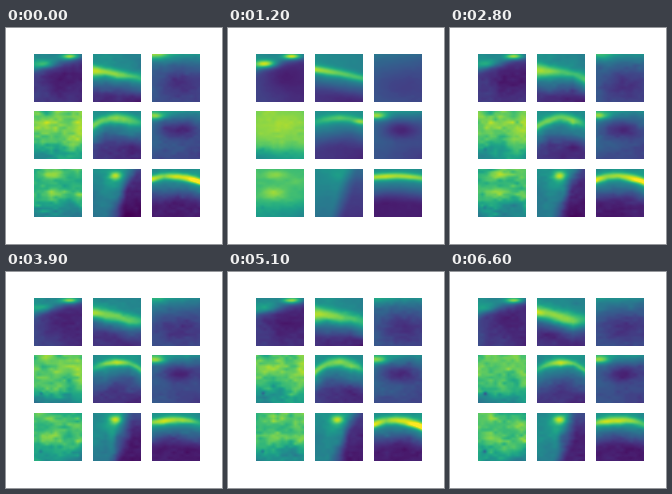
Animation of 216 by 216 pixels, one loop 6800 ms. Source, as a matplotlib script:

```python
import numpy as np
import matplotlib.pyplot as plt
from matplotlib.animation import FuncAnimation

STAGE, N = 216, 48
STEPS, INTERVAL = 68, 100
LEFTS, TOPS = (28, 87, 146), (26, 83, 141)

axis = (np.arange(N) + 0.5) / N
X, Y = np.meshgrid(axis, axis)


def blob(x, y, sx, sy):
    return np.exp(-((X - x) / sx) ** 2 - ((Y - y) / sy) ** 2)


def band(c, w):
    return np.exp(-((Y - c) / w) ** 2)


def above(c, soft):
    return 1 / (1 + np.exp(np.clip((Y - c) / soft, -40, 40)))


def ramp(d, length):
    s = np.clip(d / length, 0, 1)
    return s * s * (3 - 2 * s)


def bow(left, mid, right):
    """Parabola through three heights across the tile."""
    return (left * (1 - X) * (1 - 2 * X) + 4 * mid * X * (1 - X)
            + right * X * (2 * X - 1))


def upsample(n):
    """Linear interpolation weights from n nodes to N pixels."""
    pos = axis * (n - 1)
    return np.maximum(0, 1 - abs(pos[:, None] - np.arange(n)))


def noise(seed, rows, cols):
    grid = np.random.default_rng(seed).normal(size=(rows, cols))
    return upsample(rows) @ grid @ upsample(cols).T


# Each tile takes calm (0..1, how smooth the picture is), grow (0..1 over
# the loop), sway (-1..1) and lumps, a slowly changing cloud texture.

def ridge(calm, grow, sway, lumps):
    c = bow(0.28, 0.12, 0.02) + 0.03 * lumps
    glow = (0.2 - 0.12 * grow + 0.3 * calm) * blob(0.2, 0.21, 0.22, 0.08)
    peak = (0.42 + 0.1 * calm) * blob(0.75, 0.05, 0.18, 0.06)
    return (0.12 + 0.08 * (1 - X) - 0.07 * blob(0.55, 0.5, 0.4, 0.3)
            + 0.3 * above(c, 0.06) * (1 - 0.2 * X) + 0.13 * band(c, 0.12)
            + glow + peak)


def slope(calm, grow, sway, lumps):
    c = bow(0.33, 0.41, 0.51) - 0.03 * grow + 0.03 * lumps
    width = 0.1 + 0.05 * grow - 0.02 * calm
    return (0.5 - 0.06 * X - 0.35 * ramp(Y - c, 0.55)
            + (0.38 - 0.14 * X) * (1 + 0.2 * lumps) * band(c, width))


def haze(calm, grow, sway, lumps):
    return (0.22 + 0.05 * (1 - X)
            + (0.3 - 0.04 * grow - 0.16 * calm) * np.exp(-Y / 0.24)
            + 0.3 * (1 - calm) * (1 - grow) * blob(0.05, 0, 0.3, 0.12)
            - 0.12 * (1 - 0.5 * calm) * blob(0.55, 0.62, 0.5, 0.32))


def meadow(calm, grow, sway, lumps):
    return (0.73 + 0.05 * calm + 0.02 * sway
            - 0.2 * ramp(Y - 0.6, 0.4) - 0.1 * blob(0, 1, 0.4, 0.3)
            + 0.07 * blob(0.45, 0.3, 0.5, 0.25)
            + 0.1 * (1 - calm) * blob(0.95, 0.35, 0.12, 0.3)
            - 0.08 * grow * blob(0.5, 0.55, 0.4, 0.25)
            - 0.25 * grow * blob(0.15, 0.8, 0.04, 0.04))


def arch(calm, grow, sway, lumps):
    rise = 0.12 + 0.06 * grow - 0.04 * calm
    c = bow(0.15 + rise, 0.15, 0.14 + rise) + 0.02 * lumps
    crest = 1 - 0.45 * abs(2 * X - 1) + 0.15 * lumps
    return (0.5 - 0.33 * ramp(Y - c, 0.65) - 0.06 * X * Y
            + (0.36 - 0.12 * calm) * crest * band(c, 0.09)
            + 0.2 * calm * blob(0.95, 0.22, 0.15, 0.06))


def hollow(calm, grow, sway, lumps):
    return (0.23 + 0.27 * np.exp(-Y / 0.2) + 0.08 * (1 - X)
            + 0.38 * blob(0.06, 0.1, 0.22, 0.08)
            - 0.2 * blob(0.53, 0.38, 0.4, 0.2)
            - 0.05 * ramp(Y - 0.55, 0.4))


def field(calm, grow, sway, lumps):
    spots = blob(0.4, 0.12, 0.24, 0.09) + blob(0.38, 0.5, 0.25, 0.12)
    return (0.64 + 0.05 * grow + 0.05 * calm
            - 0.16 * ramp(Y - 0.55, 0.45) - 0.06 * blob(1, 1, 0.4, 0.4)
            + (0.2 - 0.1 * grow - 0.05 * calm) * spots
            + 0.14 * (1 - calm) * blob(0.95, 0.55, 0.12, 0.1)
            + 0.15 * grow * blob(0.9, 0.25, 0.2, 0.1)
            - 0.22 * grow * blob(0.14, 0.8, 0.04, 0.04))


def cliff(calm, grow, sway, lumps):
    edge = X - 0.5 + 0.3 * (Y - 0.2) + 0.05 * lumps
    return (0.49 - (0.36 - 0.12 * calm) * ramp(edge, 0.4)
            - 0.12 * Y * (1 - 0.6 * grow)
            + 0.1 * X * above(0.2, 0.08)
            + (1 - 0.9 * calm) * (0.36 * blob(0.47, 0.14, 0.13, 0.09)
                                  + 0.1 * blob(0.4, 0.3, 0.2, 0.2)))


def dome(calm, grow, sway, lumps):
    side = 0.06 + 0.03 * grow - 0.03 * calm
    c = bow(0.14 + side, 0.15, 0.17 + side) + 0.015 * lumps
    return (0.5 - 0.42 * ramp(Y - c, 0.6)
            + (0.38 + 0.08 * lumps) * band(c, 0.075 + 0.02 * grow))


TILES = (ridge, slope, haze, meadow, arch, hollow, field, cliff, dome)


def picture(i, step):
    grow = step / (STEPS - 2)
    calm = np.exp(-((step - 12) / 5) ** 2)
    sway = np.sin(0.9 * step + i)
    turn = 0.25 * step
    lumps = (np.cos(turn) * noise(10 + i, 5, 5)
             + np.sin(turn) * noise(20 + i, 5, 5)) * (1 - 0.7 * calm)
    flicker = noise(1000 + 9 * step + i, 18, 12)
    grain = 0.05 if TILES[i] in (meadow, field) else 0.018
    texture = grain * (lumps + 0.7 * (1 - 0.7 * calm) * flicker)
    return np.clip(TILES[i](calm, grow, sway, lumps) + texture, 0, 1)


fig = plt.figure(figsize=(3, 3), dpi=72, facecolor="white")
images = []
for i in range(9):
    left, top = LEFTS[i % 3], TOPS[i // 3]
    ax = fig.add_axes([left / STAGE, 1 - (top + N) / STAGE, N / STAGE, N / STAGE])
    ax.axis("off")
    images.append(ax.imshow(picture(i, 0), cmap="viridis", vmin=0, vmax=1,
                            interpolation="nearest", aspect="auto"))


def update(frame):
    step = min(frame, STEPS - 2)  # the last picture holds twice as long
    for i, image in enumerate(images):
        image.set_data(picture(i, step))
    return images


anim = FuncAnimation(fig, update, frames=STEPS, interval=INTERVAL,
                     repeat=True, repeat_delay=0, blit=False)
plt.show()
```
